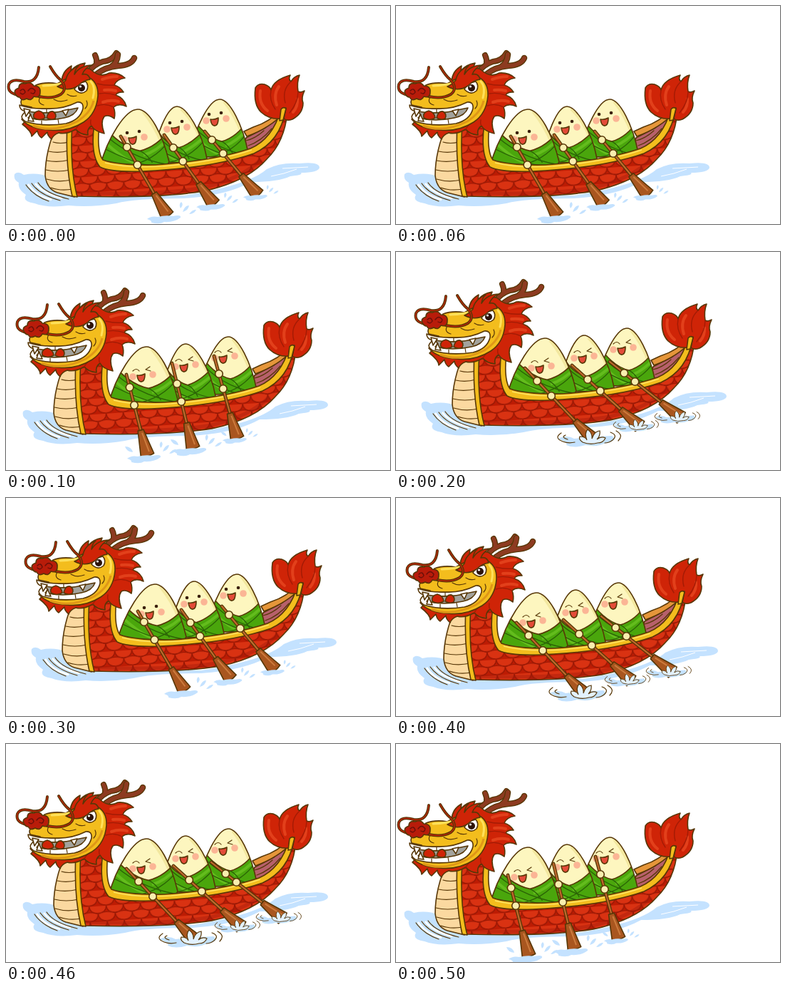
An HTML page for the animation above (0.6 s loop, 539x306 px).

```html
<!DOCTYPE html>
<html lang="en">
<head>
<meta charset="utf-8">
<title>Dragon boat</title>
<style>
html, body { margin: 0; width: 100%; height: 100%; overflow: hidden; background: #fff }
svg { display: block; width: 100%; height: 100% }
.o { stroke: #573707; stroke-width: 1.6; stroke-linejoin: round; stroke-linecap: round }
.l { fill: none; stroke: #573707; stroke-width: 1.2; stroke-linecap: round; stroke-linejoin: round }
.red { fill: #cf2407 } .deep { fill: #b81c0a } .gold { fill: #f3bd1d } .water { fill: #c4e2ff }
.shade { fill: none; stroke: #a31b05; stroke-width: 1.4; stroke-linecap: round }
.glow { fill: none; stroke: #e2401b; stroke-width: 4; stroke-linecap: round }
</style>
</head>
<body>
<svg viewBox="0 0 539 306">
<defs>
  <pattern id="scales" width="24" height="22" patternUnits="userSpaceOnUse" patternTransform="translate(4 5) rotate(-4)">
    <rect width="24" height="22" fill="#bd1c04"/>
    <g fill="#d93212" stroke="#941603" stroke-width="1.2">
      <path d="M0 11Q1 21 12 21Q23 21 24 11Q12 6 0 11"/>
      <path d="M-12 0Q-11 10 0 10Q11 10 12 0Q0 -5 -12 0M12 0Q13 10 24 10Q35 10 36 0Q24 -5 12 0"/>
    </g>
  </pattern>
</defs>
<g id="scene">
  <g class="water">
    <path d="M12 236Q17 231 25 237Q44 233 60 240L95 262L250 266Q340 252 366 229Q385 219 412 221Q440 218 440 227Q438 234 414 234Q418 237 399 239Q382 247 344 247Q310 266 250 270Q180 270 155 277Q120 283 88 280Q58 284 40 277Q22 274 28 265Q16 257 18 248Q10 244 12 236Z"/>
  </g>
  <path d="M372 239Q390 236 408 229M388 228L424 226" fill="none" stroke="#fff" stroke-width="1"/>

  <path class="o" fill="#b7606b" d="M326 214L337 185L364 171L389 147L381 178L360 203Z"/>
  <path class="l" d="M340 196Q358 190 373 172M337 189Q350 186 362 175"/>
  <path class="o" fill="#e5963a" d="M334 176L347 170Q370 163 388 144L390 150Q371 171 338 183Z"/>
  <g id="rowers"></g>

  <path class="o" fill="url(#scales)" d="M84 160L128 160Q121 207 132 224Q150 233 205 231Q293 225 346 206Q379 190 388 147L395 149Q391 191 366 215Q338 247 277 260Q215 270 98 267Q88 230 84 160Z"/>
  <path d="M100 262Q215 266 276 255Q330 243 358 215" fill="none" stroke="#9f190a" stroke-width="5" opacity=".4"/>
  <path class="o gold" d="M124 165L131 165Q127 204 136 216Q158 224 210 223Q293 217 343 200Q374 187 386 145L392 147Q385 190 348 207Q293 226 210 231Q150 235 132 226Q118 209 124 165Z"/>
  <path d="M139 220Q170 228 220 225Q298 218 345 202" fill="none" stroke="#ffe264" stroke-width="1.6"/>

  <path class="o red" d="M387 158Q370 160 358 149Q347 138 350 115Q354 108 363 110Q371 113 372 118Q375 104 399 97Q396 103 400 106Q404 99 412 97Q408 107 410 120Q414 122 419 119Q414 129 417 136Q417 151 402 159Q394 162 390 158L393 143Z"/>
  <path class="glow" d="M357 119Q354 137 367 147M383 113Q375 124 380 139M409 130Q410 141 403 149"/>
  <path class="shade" d="M372 118Q369 132 378 145M400 106Q387 118 392 136M410 120Q410 135 398 150"/>
  <path class="o gold" d="M386 145Q389 141 393 144L389 160L384 161Z"/>

  <path class="o" fill="#fbd9a0" d="M72 165Q55 203 55 238Q57 257 72 262L96 268Q86 225 88 165Z"/>
  <path class="l" d="M66 191Q76 194 88 191M60 204Q74 207 88 203M57 217Q73 220 89 216M56 230Q72 234 90 230M57 243Q73 248 92 244M63 255Q76 260 94 257"/>
  <path class="o gold" d="M86 165L93 165Q89 225 100 268L93 267Q83 223 86 165Z"/>
  <path d="M31 250Q41 266 64 272M41 249Q51 263 79 270" fill="none" stroke="#fff" stroke-width="2.4"/>
  <path class="l" d="M28 251Q38 266 60 274M36 249Q47 265 76 273M45 248Q55 263 88 271"/>

  <g class="antlers"></g>
  <path class="o red" d="M78 106Q79 91 92 84L91 91Q98 82 111 80L108 88Q117 86 121 91Q133 101 145 94Q158 93 167 101Q155 103 152 111Q160 113 165 121Q157 120 154 125Q166 129 169 141Q158 136 151 142Q154 150 152 158Q144 152 138 155Q132 163 138 179Q124 176 120 168Q113 173 115 181Q103 180 98 173Q84 181 74 178Q66 181 64 187Q58 182 58 177L50 185Q45 182 44 175L36 183Q36 176 23 166Z"/>
  <path class="glow" d="M135 103Q146 99 156 99M138 118Q146 117 154 119M136 135Q147 131 158 134"/>
  <path class="shade" d="M128 109Q140 112 152 111M131 123Q142 121 154 125M128 140Q140 136 151 142M119 160Q118 166 120 168M98 173Q101 167 108 163M94 92L86 105M109 89L99 100"/>
  <path class="o gold" d="M42 111Q55 106 72 109Q90 97 112 98Q130 105 129 126Q127 151 109 163Q87 177 61 174Q34 173 22 159Q25 155 30 156L36 142L22 139Q18 130 30 126Z"/>
  <path d="M52 112Q73 111 84 107M119 106Q126 113 122 129" fill="none" stroke="#ffe05a" stroke-width="3" stroke-linecap="round"/>
  <path d="M38 168Q66 179 100 162Q119 150 123 133" fill="none" stroke="#df9717" stroke-width="3"/>
  <path class="o" fill="#fff" d="M19 139Q35 145 58 144Q80 145 100 135Q109 134 108 144Q104 160 84 165Q52 170 27 162Q20 157 23 153L27 148Q19 146 19 139Z"/>
  <path class="o" fill="#a3a39d" d="M31 148Q62 153 91 145L101 143Q97 154 82 157Q55 163 31 157L35 153Z"/>
  <path class="o red" d="M39 157Q37 149 46 147Q54 149 55 157Q47 162 39 157ZM57 157Q59 147 66 148Q72 152 69 158Q63 161 57 157Z"/>
  <path class="o" fill="#fff" d="M25 144L28 155L34 146ZM79 147L84 154L88 145ZM31 161L34 152L39 162Z"/>
  <path class="l" d="M57 145L57 150M50 161L50 166M73 159L74 165M113 133Q116 139 111 144"/>

  <path class="o" fill="#fff" d="M96 117Q99 108 112 106Q117 112 113 119Q105 126 96 117Z"/>
  <circle cx="106" cy="115" r="5" fill="#2d1308"/>
  <circle cx="104.5" cy="113" r="1.6" fill="#fff"/>
  <path class="o red" d="M72 113Q88 121 101 112Q109 104 118 103Q116 94 107 96Q111 86 121 83Q104 83 96 96Q97 88 102 84Q86 91 84 104Q79 110 72 113Z"/>
  <path class="l" d="M86 124Q92 128 99 126M48 128Q43 136 53 139M67 131Q75 136 86 132"/>
  <g class="whiskers"></g>
  <path class="o deep" d="M14 125Q9 118 18 115Q18 107 27 109Q34 105 39 112Q49 112 48 121Q48 130 39 127Q36 134 29 130Q22 134 19 128Q16 128 14 125Z"/>
  <path class="shade" d="M20 119Q25 114 27 121Q24 126 20 122M31 119Q36 112 41 119Q40 125 35 122" style="stroke:#68100a"/>
</g>
<g id="oars"></g>
</svg>
<script>
const $ = s => document.querySelector(s);
const path = (d, attrs) => `<path d="${d}" ${attrs}/>`;
const tube = (d, color, width) =>
  path(d, `fill="none" stroke="#573707" stroke-width="${width + 2.6}" stroke-linecap="round" stroke-linejoin="round"`) +
  path(d, `fill="none" stroke="${color}" stroke-width="${width}" stroke-linecap="round" stroke-linejoin="round"`);

$('.antlers').innerHTML =
  tube('M116 92Q124 82 136 78Q149 77 155 66M127 82Q128 75 125 69', '#8d3b20', 5.5) +
  tube('M128 95Q139 86 157 84Q176 83 180 73M148 85Q156 80 157 68', '#8d3b20', 6);
$('.whiskers').innerHTML =
  tube('M17 125Q1 122 4 110Q8 101 25 106Q44 109 46 86', '#c02208', 1.4) +
  tube('M46 127Q65 131 77 124Q87 116 77 104Q70 99 62 85', '#c02208', 1.4);

// apex, top, left, right, base, mouth x, mouth y
const crew = [
  [300, 131, 256, 340, 212, 292, 162],
  [240, 141, 203, 282, 220, 237, 174],
  [185, 145, 132, 229, 225, 177, 188]
];

function rower([x, top, l, r, base, mx, my], i, shut) {
  const w = r - l, h = base - top, c = x + 3, dip = top + h * .73;
  const body = `M${l} ${base}C${l + w * .11} ${base - h * .5} ${x - w * .18} ${top} ${x} ${top}` +
    `C${x + w * .17} ${top} ${r - w * .09} ${top + h * .45} ${r} ${base - 6}L${r - 4} ${base}Z`;
  const wrap = `M${l} ${top + h * .22}Q${c - w * .3} ${dip - 6} ${c} ${dip}` +
    `Q${c + w * .25} ${dip - 6} ${r} ${top + h * .36}V${base}H${l}Z`;
  const folds = `M${l} ${top + h * .36}Q${c - w * .2} ${base - 12} ${r} ${base - 2}` +
    `M${l} ${top + h * .65}Q${c - w * .1} ${base - 4} ${c + w * .2} ${base}` +
    `M${c} ${dip}Q${c + w * .1} ${dip + 4} ${c + w * .18} ${base - 5}` +
    `M${c - w * .2} ${base}Q${c + w * .2} ${base - 6} ${r} ${top + h * .55}`;
  const eyes = shut
    ? path(`M${mx - 11} ${my - 9}Q${mx - 6} ${my - 14} ${mx - 2} ${my - 9}M${mx + 13} ${my - 15}L${mx + 7} ${my - 11}L${mx + 14} ${my - 9}`, 'class="l"')
    : `<g fill="#3b200b"><circle cx="${mx - 7}" cy="${my - 10}" r="2.3"/><circle cx="${mx + 10}" cy="${my - 12}" r="2.3"/></g>`;
  return `<clipPath id="body${i}">${path(body, '')}</clipPath>` + path(body, 'fill="#fdf6bf"') +
    `<g clip-path="url(#body${i})">` +
    path(`M${x + w * .08} ${top + 3}Q${r - w * .2} ${top + h * .3} ${r - w * .1} ${top + h * .6}`, 'fill="none" stroke="#f3e8a0" stroke-width="5"') +
    path(wrap, 'class="o" fill="#4aa60c"') +
    path(`M${c + 5} ${dip + 6}Q${c + w * .25} ${dip} ${r} ${top + h * .5}M${l} ${top + h * .5}Q${c - w * .2} ${base - 5} ${c} ${base - 3}`, 'fill="none" stroke="#63bc1d" stroke-width="4"') +
    path(folds, 'fill="none" stroke="#2a6206" stroke-width="1.3"') + '</g>' +
    path(body, 'class="o" fill="none"') +
    `<g fill="#fbb595"><circle cx="${mx - 11}" cy="${my - 1}" r="4.8"/><circle cx="${mx + 17}" cy="${my - 4}" r="4.8"/></g>` + eyes +
    path(`M${mx - 5} ${my - 3}Q${mx + 1} ${my - 2} ${mx + 6} ${my - 5}Q${mx + 6} ${my + 7} ${mx} ${my + 6}Q${mx - 4} ${my + 5} ${mx - 5} ${my - 3}Z`, 'class="o" fill="#e34b38"');
}

// grip x, y, blade end x, y, heights of both hands
const strokes = {
  pull: [[279, 176, 353, 265, 188, 207], [222, 181, 291, 278, 199, 218], [161, 183, 226, 294, 198, 223]],
  lift: [[280, 158, 312, 273, 183, 204], [221, 168, 250, 287, 197, 222], [157, 184, 186, 297, 202, 227]],
  dip: [[276, 178, 376, 257, 194, 206], [223, 183, 318, 269, 203, 219], [157, 187, 252, 287, 205, 226]]
};

function oar([x, y, ex, ey, h1, h2]) {
  const len = Math.hypot(ex - x, ey - y), turn = Math.atan2(ey - y, ex - x) * 180 / Math.PI;
  const s = len - 36;
  const hand = hy => `<circle cx="${x + (ex - x) * (hy - y) / (ey - y)}" cy="${hy}" r="5.3" class="o" fill="#f8eeae"/>`;
  return `<g transform="translate(${x} ${y}) rotate(${turn})">` + tube(`M0 0H${s}`, '#c0692d', 2.2) +
    path(`M${s} -4Q${s + 14} -6 ${len} -10Q${len + 3} 0 ${len} 9Q${s + 14} 6 ${s} 4Z`, 'class="o" fill="#a9561f"') +
    path(`M${s + 4} -1L${len - 4} -4`, 'stroke="#cc7b3d" stroke-width="2"') + '</g>' + hand(h1) + hand(h2);
}

const drops = 'M28 -7q3 -9 9 -9q-1 7 -9 9M37 -4q5 -7 10 -6q-3 6 -10 6M25 -12q-3 -6 1 -9q4 4 -1 9';
const foam = 'M-23 4Q-17 -1 -8 1Q4 -2 13 0Q25 -3 24 2Q15 9 1 8Q-5 12 -17 9Q-16 6 -23 4Z';
const crown = 'M-12 4Q-18 0 -16 -4Q-8 -4 -6 1Q-10 -9 -5 -14Q2 -9 1 -1Q4 -11 12 -12Q13 -5 8 0Q14 -5 20 -2Q17 5 9 5Q-2 8 -12 4Z';

function splash([, , x, y], pose) {
  const size = x > 300 ? .72 : x > 240 && y < 286 ? .85 : 1;
  const group = dx => `<g transform="translate(${x + dx} ${y}) scale(${size})">`;
  if (pose != 'dip') {
    const side = pose == 'lift' ? path('M-20 -4q-9 -1 -11 -8q9 0 11 8', '') : '';
    return `${group(0)}<g class="water">${path(foam, 'transform="translate(-5 1)"')}${path(drops, 'transform="translate(-6 2)"')}${side}</g></g>`;
  }
  return group(-6) + path('M-43 -1Q-30 -7 -20 -1Q8 -4 33 -5Q43 2 22 6Q12 11 -4 8Q-20 13 -31 8Q-28 4 -43 -1Z', 'class="water"') +
    path(crown, 'fill="#e2f1ff" stroke="#573707" stroke-width="1.2" transform="translate(4 0)"') +
    path('M-38 -9Q-49 -2 -36 3Q-28 6 -19 4M-32 -6Q-39 -3 -29 0M31 -10Q42 -6 34 1Q29 5 23 5M39 -12Q50 -6 42 2', 'class="l"') + '</g>';
}

const poses = ['pull', 'lift', 'dip', 'pull', 'dip', 'lift'];
const shifts = [0, 12, 24, 24, 12, 0];
let shown = -1;

function draw(now) {
  const step = Math.floor(now / 100) % 6;
  if (step == shown) return;
  shown = step;
  const pose = poses[step], move = `translate(${shifts[step]} ${-shifts[step]})`;
  $('#rowers').innerHTML = crew.map((c, i) => rower(c, i, pose != 'pull')).join('');
  $('#oars').innerHTML = strokes[pose].map(s => oar(s) + splash(s, pose)).join('');
  $('#scene').setAttribute('transform', move);
  $('#oars').setAttribute('transform', move);
}

const start = performance.now();
function tick() {
  draw(performance.now() - start);
  requestAnimationFrame(tick);
}
tick();
</script>
</body>
</html>
```
